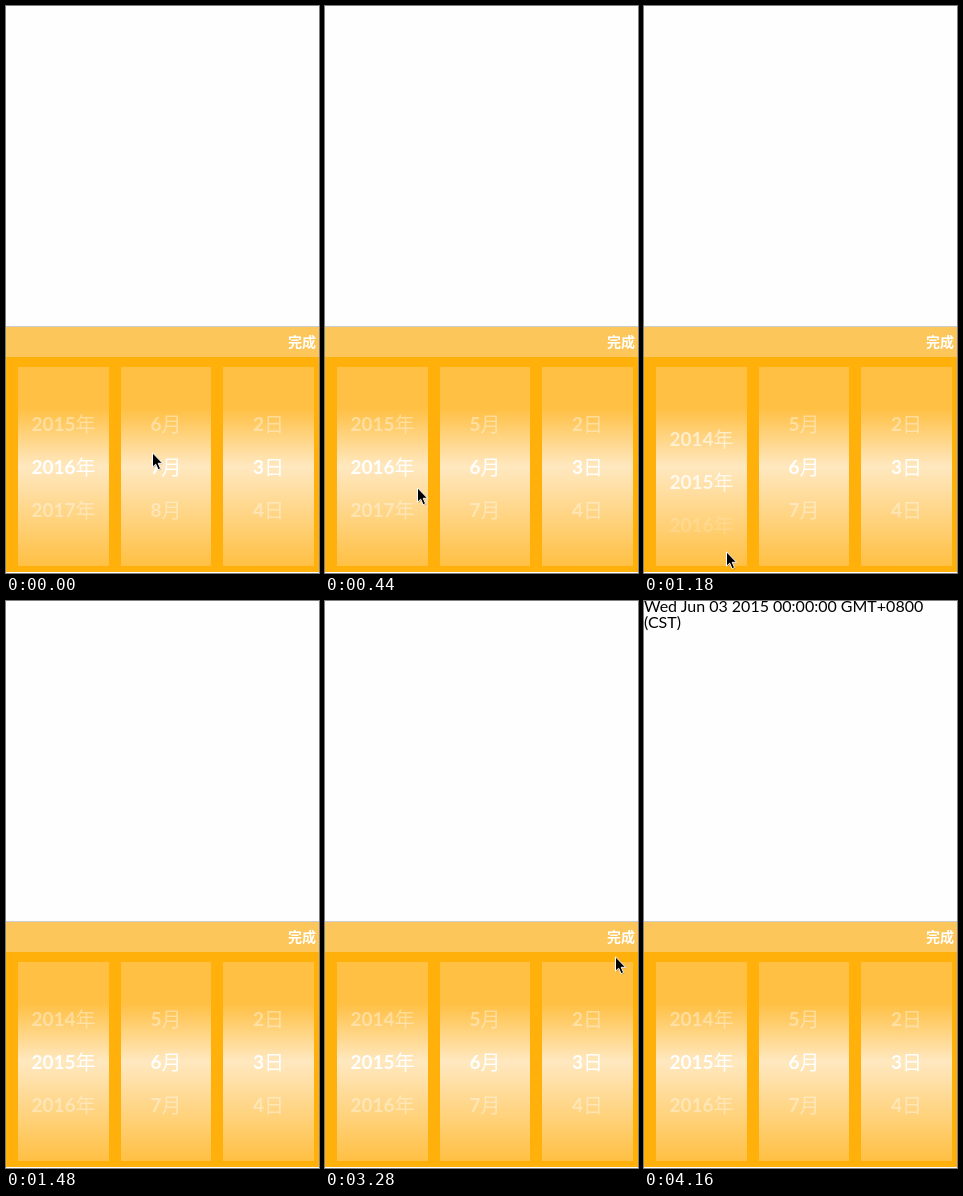
An HTML page for the animation above (6280 ms loop, 313 by 567 pixels).

```html
<!DOCTYPE html>
<html lang="zh">
<head>
<meta charset="utf-8">
<title>Date picker</title>
<style>
  html, body { margin: 0; width: 100%; height: 100%; overflow: hidden; background: #fefefe; }
  svg { display: block; width: 313px; height: 567px; }
  text { font-family: Lato, "Noto Sans CJK SC", "Noto Sans CJK", sans-serif; }
  .wheel text { font-size: 19px; font-weight: 700; fill: #fff; text-anchor: middle; }
  .wheel .unit { font-size: 20px; font-weight: 500; }
  .done { font-size: 14px; font-weight: 700; fill: #fff; text-anchor: end; }
  .result { font-size: 16px; fill: #000; }
</style>
</head>
<body>
<svg viewBox="0 0 313 567">
  <defs>
    <linearGradient id="glow" x1="0" y1="0" x2="0" y2="1">
      <stop offset="0" stop-color="#ffc044"/>
      <stop offset=".21" stop-color="#ffc044"/>
      <stop offset=".5" stop-color="#ffe8c0"/>
      <stop offset="1" stop-color="#ffc044"/>
    </linearGradient>
  </defs>
  <rect y="320" width="313" height="1" fill="#ccc"/>
  <rect y="321" width="313" height="30" fill="#fdc65b"/>
  <rect y="351" width="313" height="215" fill="#ffb00a"/>
  <text class="done" x="310" y="341">完成</text>
  <g id="wheels"></g>
  <g id="result" class="result">
    <text x="0" y="11">Wed Jun 03 2015 00:00:00 GMT+0800</text>
    <text x="0" y="27">(CST)</text>
  </g>
  <g id="cursor">
    <path d="M2.5 2.5V16l3-2.8 2.3 5.3 2.6-1.1-2.3-5.2H12z" fill="#000" opacity=".25"/>
    <path d="M1.5.8V15.2l3.2-3 2.4 5.5 2.5-1.1-2.4-5.3h4.4z" fill="#000" stroke="#fff"/>
  </g>
</svg>
<script>
const LOOP = 6280, TICK = 149.2, LEAD = 20;
const ROW = 43, MID = 468, FADE = 70, SPEED = 0.65;
const $ = id => document.getElementById(id);

// Cursor visits: stops are [tick, x, y], joined by ease-out moves.
const visits = [
  { until: 10, stops: [[0, 145, 446], [1, 144, 523], [2, 144, 523], [5, 48, 448],
                       [6, 49, 465], [7, 81, 545], [8, 81, 545], [9, 96, 545]] },
  { until: 28, stops: [[20, 287, 475], [21, 295, 378], [24, 284, 337]] }
];

function cursorAt(k) {
  const visit = visits.find(v => k >= v.stops[0][0] && k < v.until);
  if (!visit) return null;
  const i = visit.stops.findLastIndex(s => s[0] <= k);
  const [k0, x0, y0] = visit.stops[i];
  const [k1, x1, y1] = visit.stops[i + 1] || [k0 + 1, x0, y0];
  const p = 1 - (1 - (k - k0) / (k1 - k0)) ** 2;
  return [x0 + (x1 - x0) * p, y0 + (y1 - y0) * p];
}

// Rows pulled down: steady while dragged, then settling on the nearest row.
function pull(k, start, release) {
  const rows = SPEED * Math.max(0, Math.min(k, release) - start);
  if (k <= release) return rows;
  const rest = Math.round(rows);
  return rest + (rows - rest) * 0.03 ** (k - release);
}

function el(name, attrs, parent) {
  const node = document.createElementNS("http://www.w3.org/2000/svg", name);
  for (const key in attrs) node.setAttribute(key, attrs[key]);
  return parent.appendChild(node);
}

function makeWheel(x, width, unit, valueAt) {
  const group = el("g", { class: "wheel" }, $("wheels"));
  el("rect", { x, y: 361, width, height: 199, fill: "url(#glow)" }, group);
  const rows = [-2, -1, 0, 1, 2].map(offset => {
    const text = el("text", { x: x + width / 2 }, group);
    const number = el("tspan", {}, text);
    el("tspan", { class: "unit", dy: 1 }, text).textContent = unit;
    return { offset, text, number };
  });
  return k => {
    const value = valueAt(k);
    for (const { offset, text, number } of rows) {
      const n = Math.round(value) + offset;
      const d = (n - value) * ROW;
      number.textContent = n;
      text.setAttribute("y", MID + d);
      text.setAttribute("opacity", Math.max(0, 1 - Math.abs(d) / FADE));
    }
  };
}

const wheels = [
  makeWheel(12, 91, "年", k => 2016 - pull(k, 5.93, 8)),
  makeWheel(115, 90, "月", k => 7 - pull(k, 0, 1)),
  makeWheel(217, 91, "日", () => 3)
];

function draw() {
  const k = Math.floor((performance.now() % LOOP + LEAD) / TICK);
  wheels.forEach(update => update(k));
  const spot = cursorAt(k);
  $("cursor").style.display = spot ? "" : "none";
  if (spot) $("cursor").setAttribute("transform", `translate(${spot.map(Math.round)})`);
  $("result").style.display = k < 25 ? "none" : "";
  requestAnimationFrame(draw);
}
draw();
</script>
</body>
</html>
```
